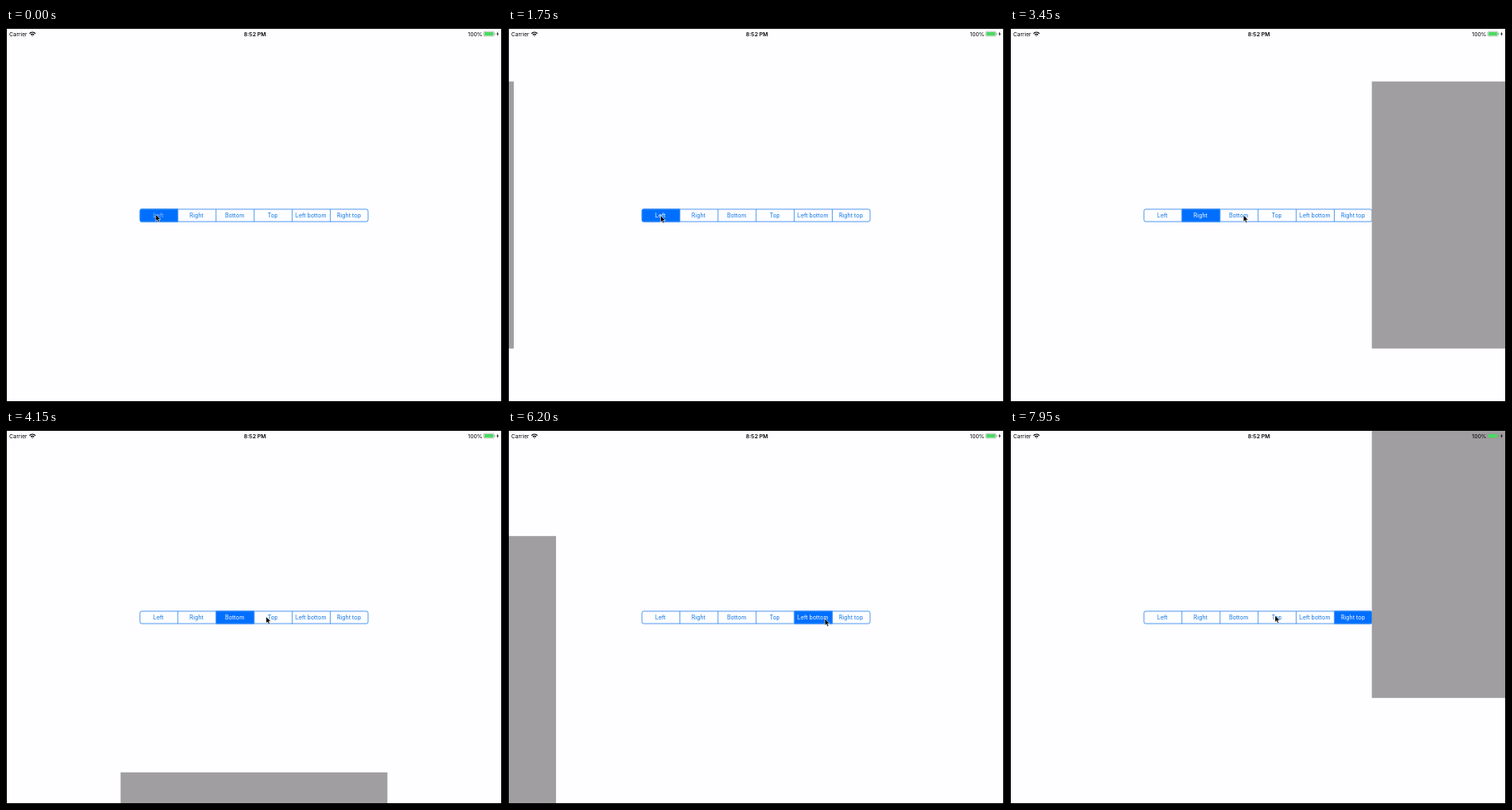
An HTML page that plays this animation: 600x452 px, repeating every 8 s.

```html
<!DOCTYPE html>
<html lang="en">
<head>
<meta charset="utf-8">
<title>Sliding panels</title>
<style>
  html, body { margin: 0; width: 100%; height: 100%; overflow: hidden; background: #fefdff; }
  svg { display: block; width: 100vw; height: 100vh; }
  text { font-family: Inter, "Liberation Sans", sans-serif; font-size: 6.6px; }
  #labels text { font-size: 6.9px; text-anchor: middle; fill: #0a76e6; }
</style>
</head>
<body>
<svg viewBox="0 0 600 452" xmlns="http://www.w3.org/2000/svg">
  <defs>
    <clipPath id="round"><rect x="161.5" y="218.5" width="277" height="16" rx="2.5"/></clipPath>
  </defs>
  <rect width="600" height="452" fill="#fefdff"/>

  <g clip-path="url(#round)">
    <rect id="pressed" y="218" width="46.2" height="17" fill="#cfe3fc"/>
    <rect id="selected" y="218" width="46.2" height="17" fill="#006fff"/>
  </g>
  <rect x="162" y="219" width="276" height="15" rx="2.2" fill="none" stroke="#3d8fee" stroke-width=".9"/>
  <path id="dividers" stroke="#3d8fee" stroke-width=".9"/>
  <g id="labels"></g>

  <rect id="panel" fill="#a09ea0"/>

  <text x="4" y="9.5">Carrier</text>
  <g fill="none" stroke="#000" stroke-width="1.3">
    <path d="M28.4 6.6a5.2 5.2 0 0 1 7.2 0M30 8.3a2.9 2.9 0 0 1 4 0"/>
    <path d="M31 9.2h2l-1 1z" fill="#000" stroke="none"/>
  </g>
  <text x="301" y="9.6" text-anchor="middle" font-weight="600">8:52 PM</text>
  <text x="576.3" y="9.5" text-anchor="end">100%</text>
  <rect x="577.8" y="4.3" width="12.6" height="5.6" rx="1.2" fill="none" stroke="#8a8f8a" stroke-width=".5"/>
  <rect x="578.6" y="5" width="11" height="4.2" rx=".7" fill="#4cd964"/>
  <path d="M591.2 6.2v1.8" stroke="#8a8f8a" stroke-width=".7"/>
  <path d="M595.3 4.2l-2 3.2h1.3l-.5 2.6 2-3.3h-1.3z"/>

  <rect x=".5" y=".5" width="599" height="451" fill="none" stroke="#000"/>
  <path id="cursor" d="M0 0v8.2l1.9-1.7 1.3 2.9 1.5-.7-1.3-2.8h2.6z" stroke="#fff" stroke-width=".6"/>
</svg>
<script>
const LOOP = 8000, STEP = 50, SLIDE = 350;
const CELL = 46.1, X0 = 161.8;
const SHORT = 161.3, LONG = 322.8;
const $ = id => document.getElementById(id);

// Resting box and the offset at which the panel is hidden
const panels = {
  left:        [1, 64.6, SHORT, LONG, -SHORT, 0],
  right:       [599 - SHORT, 64.6, SHORT, LONG, SHORT, 0],
  bottom:      [138.6, 451 - SHORT, LONG, SHORT, 0, SHORT],
  top:         [138.6, 1, LONG, SHORT, 0, -SHORT],
  leftBottom:  [1, 451 - LONG, SHORT, LONG, -SHORT, 0],
  rightTop:    [599 - SHORT, 1, SHORT, LONG, SHORT, 0]
};

// Start time, panel, 1 = slide in, 0 = slide out
const slides = [
  [80, 'left', 1], [914, 'left', 0], [1731, 'left', 1],
  [2700, 'left', 0], [3050, 'right', 1],
  [3740, 'right', 0], [4090, 'bottom', 1],
  [4721, 'bottom', 0], [5071, 'top', 1],
  [5771, 'top', 0], [6121, 'leftBottom', 1],
  [6826, 'leftBottom', 0], [7176, 'rightTop', 1]
];

// Touch down, touch up, segment
const taps = [
  [0, 80, 0], [1650, 1731, 0], [2600, 2650, 1], [3650, 3740, 2],
  [4700, 4721, 3], [5700, 5771, 4], [6750, 6826, 5]
];

// Time and position of the pointer tip
const path = [
  [0, 181, 225.2], [700, 184.5, 226.6], [2050, 184.5, 226.6], [2550, 233, 226],
  [2950, 233, 226], [3450, 282.3, 226], [3750, 282.3, 226], [4450, 335.5, 225],
  [5100, 335.5, 225], [5600, 383.2, 228], [6250, 383.2, 228], [6700, 424, 227],
  [7000, 424, 227], [7950, 320.5, 224]
];

const labels = ['Left', 'Right', 'Bottom', 'Top', 'Left bottom', 'Right top'].map((name, i) => {
  const label = document.createElementNS('http://www.w3.org/2000/svg', 'text');
  label.textContent = name;
  label.setAttribute('x', X0 + CELL * (i + .5) - .5);
  label.setAttribute('y', 228.8);
  return $('labels').appendChild(label);
});
$('dividers').setAttribute('d', [1, 2, 3, 4, 5].map(i => `M${X0 + CELL * i} 219v15`).join(''));

const clamp = v => Math.min(1, Math.max(0, v));
const lastBefore = (list, t) => list.filter(item => item[0] <= t).pop();

// cubic-bezier(.25, .1, .25, 1)
function ease(x) {
  let lo = 0, hi = 1;
  for (let i = 0; i < 20; i++) {
    const u = (lo + hi) / 2;
    if (.75 * u * (1 - u) + u ** 3 < x) lo = u; else hi = u;
  }
  return .3 * lo * (1 - lo) ** 2 + 3 * lo ** 2 - 2 * lo ** 3;
}

function drawPanel(t) {
  const [start, name, show] = lastBefore(slides, t) || [0, 'left', 1];
  const p = ease(clamp((t - start) / SLIDE));
  const hidden = t < slides[0][0] ? 1 : show ? 1 - p : p;
  const [x, y, w, h, dx, dy] = panels[name];
  const box = { x: x + dx * hidden, y: y + dy * hidden, width: w, height: h };
  for (const key in box) $('panel').setAttribute(key, box[key]);
}

function drawSegments(t) {
  const tap = lastBefore(taps, t);
  const held = t < tap[1] ? tap[2] : -1;
  const chosen = taps.filter(item => item[1] <= t).pop()?.[2] ?? 0;
  $('selected').setAttribute('x', X0 + CELL * chosen);
  $('pressed').setAttribute('x', held < 0 ? -100 : X0 + CELL * held);
  labels.forEach((label, i) => {
    label.style.fill = i !== chosen ? '' : i === held ? '#8dbcff' : '#fff';
  });
}

function drawCursor(t) {
  const i = Math.max(1, path.findIndex(k => k[0] > t));
  const [a, b] = t >= path.at(-1)[0] ? [path.at(-1), path.at(-1)] : [path[i - 1], path[i]];
  const k = clamp((t - a[0]) / (b[0] - a[0] || 1));
  const s = k * k * (3 - 2 * k);
  $('cursor').setAttribute('transform',
    `translate(${a[1] + (b[1] - a[1]) * s} ${a[2] + (b[2] - a[2]) * s})`);
}

const begin = performance.now();
function frame() {
  const t = Math.floor((performance.now() - begin) % LOOP / STEP) * STEP;
  drawPanel(t);
  drawSegments(t);
  drawCursor(t);
  requestAnimationFrame(frame);
}
frame();
</script>
</body>
</html>
```
